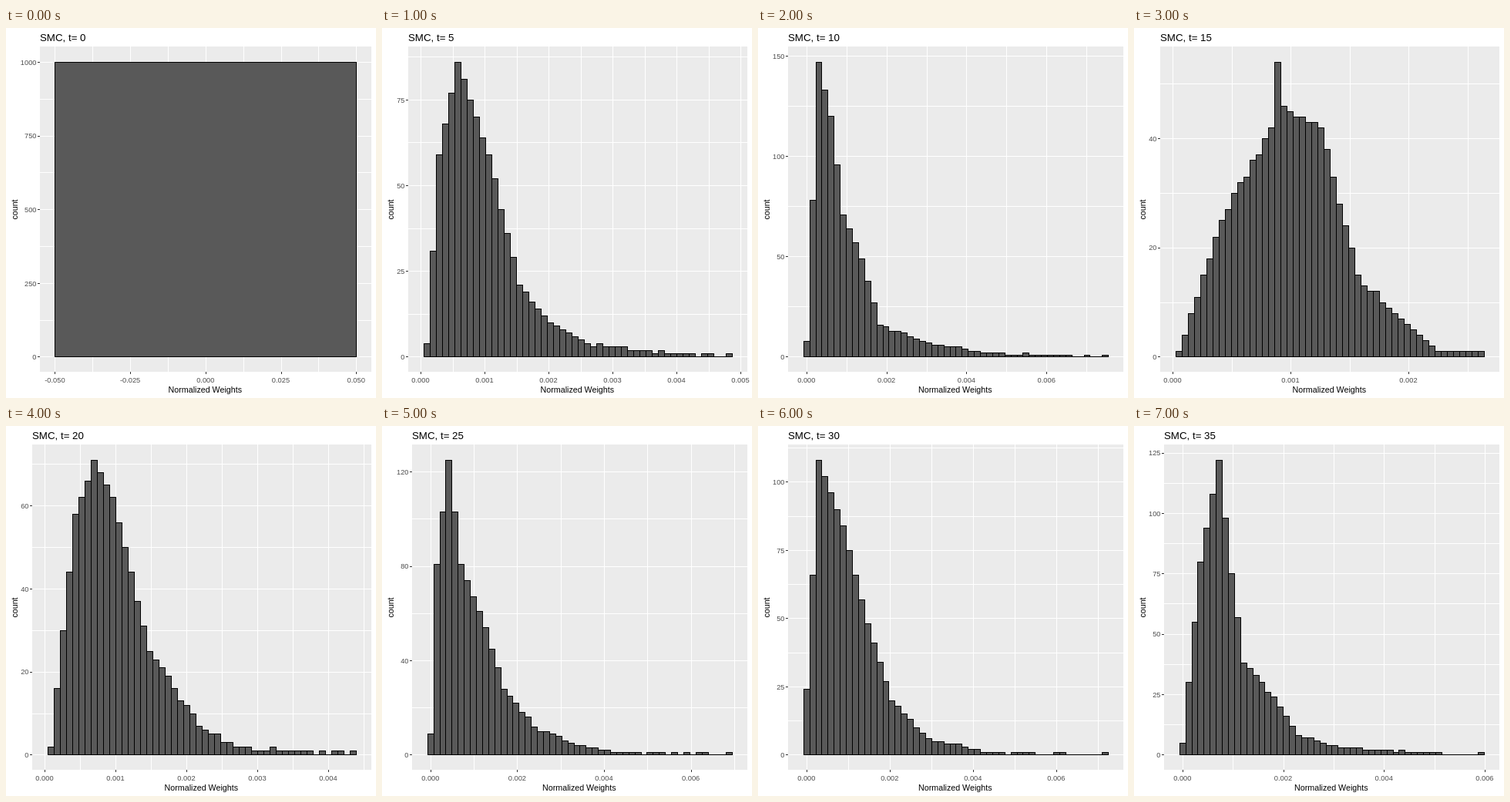
Recreate the animation shown at these times as an HTML page. Size 480 px wide and 480 px high, loop 8000 ms.

```html
<!DOCTYPE html>
<html lang="en">
<head>
<meta charset="utf-8">
<title>Weight histogram</title>
<style>
  html, body { margin: 0; width: 100%; height: 100%; overflow: hidden; background: #fff; }
  svg { display: block; width: 480px; height: 480px; font-family: "Liberation Sans", Arial, sans-serif; }
  rect, path { shape-rendering: crispEdges; }
  .bars { fill: #595959; stroke: #000; }
  .grid { stroke: #fff; }
  .tick { stroke: #333; }
  .label { font-size: 9.3px; fill: #4d4d4d; }
  .axis { font-size: 10.7px; text-anchor: middle; }
  .title { font-size: 13.3px; }
</style>
</head>
<body>
<svg id="stage" viewBox="0 0 480 480"></svg>
<script>
const STEP = 1000, BINS = 50;
const TOP = 24, RIGHT = 474, BOTTOM = 446, BASE = 426.4, PEAK = 44;
const stage = document.getElementById('stage');
const plots = [];

function add(parent, tag, attrs, text) {
  const el = document.createElementNS('http://www.w3.org/2000/svg', tag);
  for (const key in attrs) el.setAttribute(key, attrs[key]);
  if (text !== undefined) el.textContent = text;
  parent.appendChild(el);
  return el;
}

const snap = v => Math.round(v) + 0.5;

// Bin counts along straight runs between a few { bin: count } points;
// fractions are rounded up or down at random, which thins out the tail.
function profile(points, seed) {
  const rnd = () => (seed = seed * 16807 % 2147483647) / 2147483647;
  const at = Object.keys(points).map(Number);
  const counts = Array.from({ length: BINS }, (_, i) => {
    const k = Math.max(1, at.findIndex(b => b >= i));
    const [a, b] = [at[k - 1], at[k]];
    const v = points[a] + (points[b] - points[a]) * (i - a) / (b - a);
    return Math.floor(v + rnd());
  });
  return counts;
}

// x: pixel of the first tick, pixels per tick, first value, value per tick
function plot(left, x, yStep, counts) {
  const g = add(stage, 'g', { visibility: 'hidden' });
  const width = RIGHT - left;
  const mid = left + width / 2;
  const scale = (BASE - PEAK) / Math.max(...counts);
  const inner = width / 1.1;
  const start = mid - inner / 2;
  const edge = i => snap(start + inner * i / counts.length - 0.05);
  let grid = '', ticks = '';

  add(g, 'rect', { x: left, y: TOP, width, height: BOTTOM - TOP, fill: '#ebebeb' });

  // Odd steps are the minor grid lines, without tick or label
  for (let k = 0; ; k++) {
    const px = x[0] + k * x[1] / 2;
    if (px > RIGHT) break;
    grid += `M${snap(px)} ${TOP}V${BOTTOM}`;
    if (k % 2) continue;
    ticks += `M${snap(px)} ${BOTTOM}v3`;
    add(g, 'text', { class: 'label', x: px, y: 459.5, 'text-anchor': 'middle' },
      (x[2] + k / 2 * x[3]).toFixed(3));
  }
  for (let k = 0; ; k++) {
    const py = BASE - k * yStep / 2 * scale;
    if (py < TOP) break;
    grid += `M${left} ${snap(py)}H${RIGHT}`;
    if (k % 2) continue;
    ticks += `M${left - 3} ${snap(py)}h3`;
    add(g, 'text', { class: 'label', x: left - 4.5, y: py + 3.7, 'text-anchor': 'end' }, k / 2 * yStep);
  }
  add(g, 'path', { class: 'grid', d: grid });
  add(g, 'path', { class: 'tick', d: ticks });

  const bars = counts.map((n, i) =>
    `M${edge(i)} ${snap(BASE)}V${snap(BASE - n * scale)}H${edge(i + 1)}V${snap(BASE)}Z`);
  add(g, 'path', { class: 'bars', d: bars.join('') });

  add(g, 'text', { class: 'title', x: left, y: 16.6 }, `SMC, t= ${plots.length * 5}`);
  add(g, 'text', { class: 'axis', x: mid - 0.7, y: 473 }, 'Normalized Weights');
  add(g, 'text', { class: 'axis', transform: 'translate(15 235.5) rotate(-90)' }, 'count');
  plots.push(g);
}

plot(44, [63.4, 97.7, -0.05, 0.025], 250, [1000]);

plot(34, [50, 83, 0, 0.001], 25,
  profile({ 0: 4, 2: 59, 5: 86, 10: 59, 15: 21, 20: 10, 26: 4, 34: 2, 48: 0, 49: 1 }, 11));

plot(39, [62.8, 103.8, 0, 0.002], 50,
  profile({ 0: 8, 2: 147, 4: 120, 6: 71, 9: 49, 12: 16, 20: 7, 30: 2, 48: 0, 49: 1 }, 22));

plot(34, [50, 153, 0, 0.001], 20,
  profile({ 0: 1, 7: 25, 15: 42, 16: 54, 17: 46, 23: 42, 29: 15, 36: 7, 42: 1, 49: 1 }, 33));

plot(34, [50, 92, 0, 0.001], 20,
  profile({ 0: 2, 4: 58, 7: 71, 10: 62, 16: 25, 24: 7, 30: 2, 48: 0, 49: 1 }, 44));

plot(39, [62.8, 112.6, 0, 0.002], 40,
  profile({ 0: 9, 1: 81, 3: 125, 5: 81, 9: 54, 12: 28, 17: 12, 24: 4, 30: 1, 48: 0, 49: 1 }, 55));

plot(39, [62.8, 108, 0, 0.002], 25,
  profile({ 0: 24, 2: 108, 6: 84, 10: 48, 14: 20, 20: 6, 30: 1, 48: 0, 49: 1 }, 66));

plot(39, [62.8, 130.7, 0, 0.002], 25,
  profile({ 0: 5, 3: 80, 6: 122, 8: 75, 10: 38, 15: 24, 19: 8, 25: 4, 32: 2, 48: 0, 49: 1 }, 77));

let shown = -1;
const began = performance.now();
function tick() {
  const now = Math.floor((performance.now() - began) / STEP) % plots.length;
  if (now !== shown) {
    plots.forEach((g, i) => g.setAttribute('visibility', i === now ? 'visible' : 'hidden'));
    shown = now;
  }
  requestAnimationFrame(tick);
}
tick();
</script>
</body>
</html>
```
